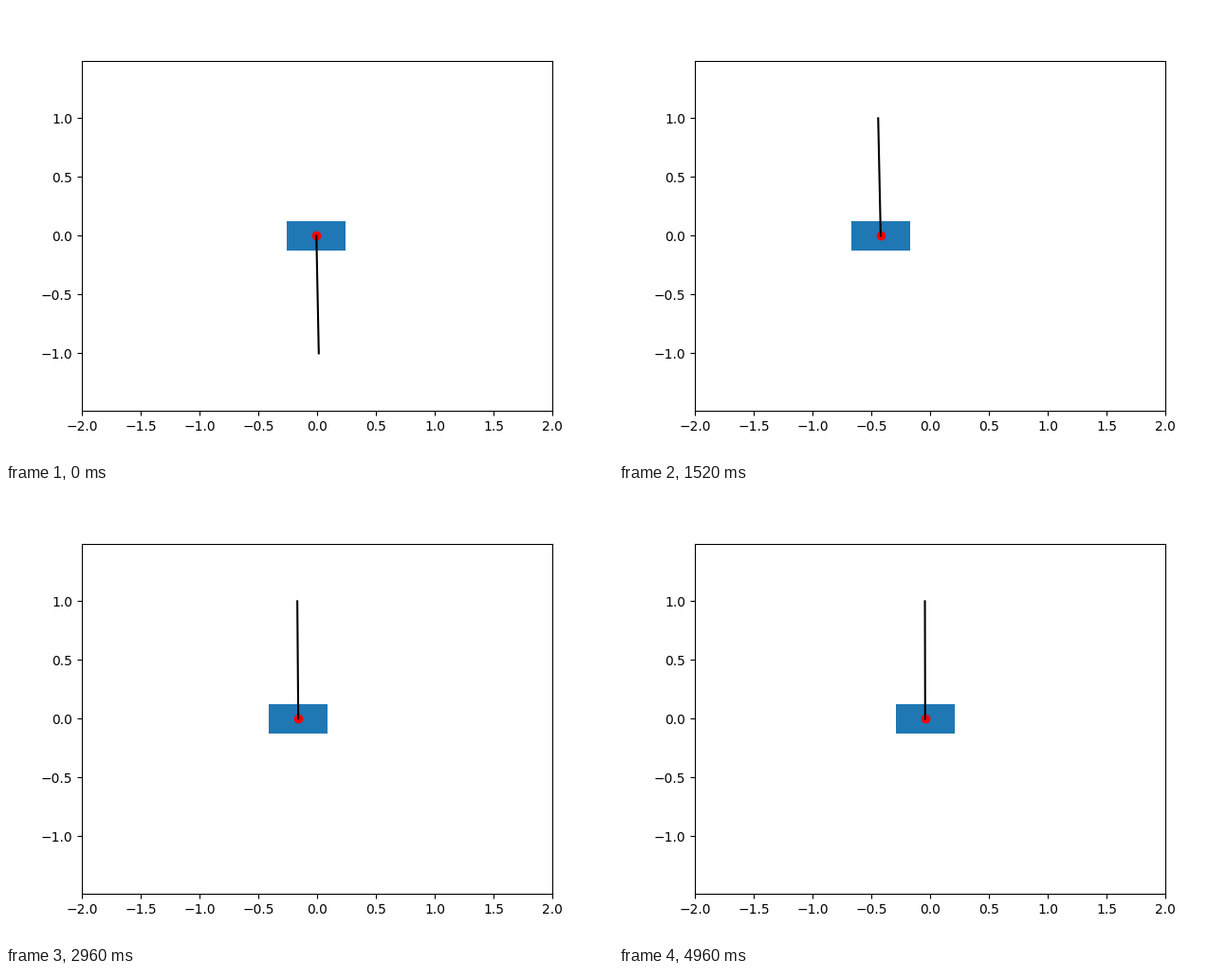
A matplotlib script that plays this animation: 640 px wide and 480 px high, repeating every 5 s.

```python
import numpy as np
import matplotlib.pyplot as plt
from matplotlib.animation import FuncAnimation
from matplotlib.patches import Rectangle

FRAMES = 125
INTERVAL = 40
CART_W, CART_H = 0.5, 0.25
POLE = 1.0

DRIFT_RATE = 0.67            # slow return of the cart to the centre
DAMPING, FREQ = 4.05, 7.5    # quick push to the left
HEAD_START = 0.012           # seconds already moved at the start of the loop
SWING_TIME = 0.4136          # time scale of the pole's swing to upright
LEAN = 0.051                 # pole tilt per unit of cart offset


def damped_step(t):
    """Underdamped rise from 0 to 1."""
    wave = np.cos(FREQ * t) + DAMPING / FREQ * np.sin(FREQ * t)
    return 1 - np.exp(-DAMPING * t) * wave


def state(t):
    """Cart position and pole angle from upright (right is positive)."""
    drift = -0.42 * np.exp(-DRIFT_RATE * (t - 1.52))
    x = drift * damped_step(t + HEAD_START)
    swing = (np.pi - 0.02) * np.exp(-(t / SWING_TIME) ** 2)
    return x, swing + LEAN * x


fig, ax = plt.subplots(figsize=(6.4, 4.8), dpi=100)
ax.set_xlim(-2, 2)
half_height = 2 * 369.6 / 496  # equal scale on both axes
ax.set_ylim(-half_height, half_height)

cart = ax.add_patch(Rectangle((0, -CART_H / 2), CART_W, CART_H))
pivot, = ax.plot([], [], "ro")
pole, = ax.plot([], [], "k-")


def update(frame):
    x, angle = state(frame * INTERVAL / 1000)
    cart.set_x(x - CART_W / 2)
    pivot.set_data([x], [0])
    pole.set_data([x, x + POLE * np.sin(angle)], [0, POLE * np.cos(angle)])
    return cart, pivot, pole


anim = FuncAnimation(fig, update, frames=FRAMES, interval=INTERVAL, repeat=True)
plt.show()
```
